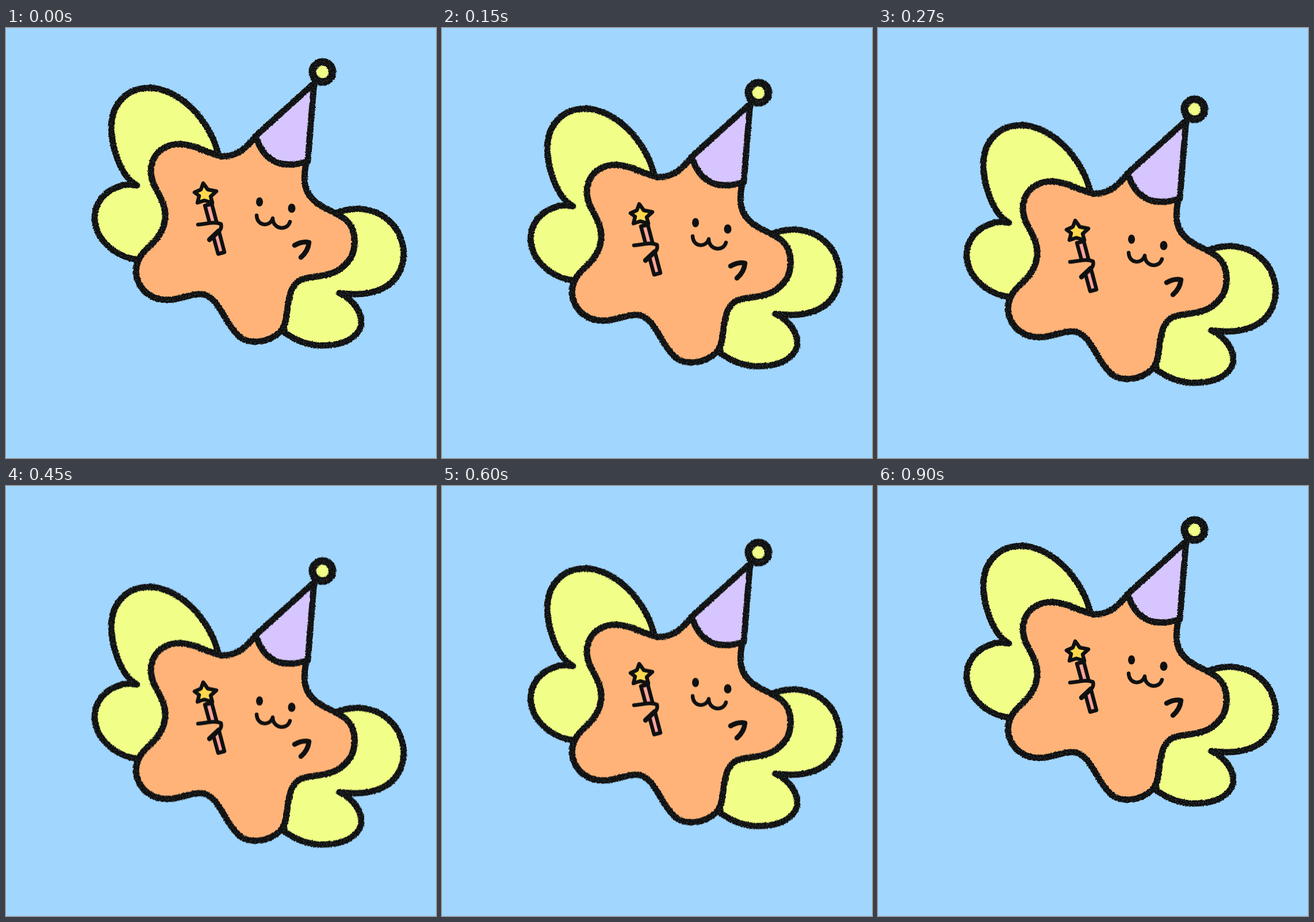
Animation of 748 by 748 pixels, one loop 0.93 s. Source, as an HTML page without scripts:

```html
<!DOCTYPE html>
<html lang="en">
<head>
<meta charset="utf-8">
<title>Floating star fairy</title>
<style>
  html, body { margin: 0; width: 100%; height: 100%; overflow: hidden; background: #a1d6ff; }
  svg { display: block; width: 100%; height: 100%; }

  .ink { fill: none; stroke: #0f1011; stroke-width: 11; stroke-linecap: round; stroke-linejoin: round; }
  .lime { fill: #f1ff88; }
  .peach { fill: #ffb378; }
  .lilac { fill: #d6c5ff; }
  .gold { fill: #ffd84c; }
  .pink { fill: #ffa39b; }
  .fine { stroke-width: 6.5; }
  .hand { stroke-width: 8.5; }
  .pom { stroke-width: 13.5; }
  .eye { fill: #0f1011; }

  .float { animation: float 930ms infinite; }
  @keyframes float {
    0% { transform: translateY(0); animation-timing-function: cubic-bezier(.15, 0, .64, 1); }
    40.32% { transform: translateY(76px); animation-timing-function: cubic-bezier(.35, 0, .49, 1); }
    96.77%, 100% { transform: translateY(0); }
  }
</style>
</head>
<body>
<svg viewBox="0 0 748 748">
  <defs>
    <!-- Rough edges, plus grey grain that only shows on the dark ink -->
    <filter id="crayon" filterUnits="userSpaceOnUse" x="130" y="40" width="590" height="530" color-interpolation-filters="sRGB">
      <feTurbulence type="fractalNoise" baseFrequency=".4" numOctaves="2" seed="4" result="noise"/>
      <feDisplacementMap in="SourceGraphic" in2="noise" scale="3.5" xChannelSelector="R" yChannelSelector="G" result="rough"/>
      <feColorMatrix in="noise" values="0 0 0 0 .2  0 0 0 0 .22  0 0 0 0 .21  0 0 5 0 -2.7" result="grain"/>
      <feBlend in="grain" in2="rough" mode="lighten"/>
      <feComposite in2="rough" operator="in"/>
    </filter>
  </defs>

  <g class="float">
    <g class="ink" filter="url(#crayon)">
      <!-- Wings -->
      <path class="lime" d="M369 220C359 170 308 106 250 104C211 104 185 130 183 170C183 205 198 258 228 274C196 266 154 290 154 331C156 372 193 398 228 403"/>
      <path class="lime" d="M576 321C640 298 693 340 692 396C688 450 640 470 580 461C608 474 622 500 617 520C606 548 570 554 540 552C517 549 500 541 485 530L470 440"/>

      <!-- Body -->
      <path class="peach" d="M433 190C420 206 403 224 376 223C350 219 330 202 300 202C271 203 253 222 252 248C252 280 278 295 277 328C276 356 258 372 245 384C228 400 224 418 227 432C233 458 254 473 280 473C304 473 320 462 340 463C373 467 378 516 410 540C428 550 456 547 476 530C494 508 485 485 497 455C511 424 545 440 577 422C602 407 610 385 605 358C599 326 565 322 542 305C519 288 515 268 523 232"/>

      <!-- Hat -->
      <path class="lilac" d="M434 188L536 96L525 232C490 243 452 242 434 188Z"/>
      <circle class="lime pom" cx="550.5" cy="76.5" r="17.5"/>
    </g>

    <g class="ink fine">
      <!-- Face -->
      <ellipse class="eye" stroke="none" cx="441" cy="302.5" rx="6" ry="8"/>
      <ellipse class="eye" stroke="none" cx="497" cy="313.5" rx="6.5" ry="8"/>
      <path d="M436 326C437 346 460 346 464 331C464 350 489 354 494 337"/>

      <!-- Wand -->
      <path class="pink" d="M346 309L358 306L380 390L369 393Z"/>
      <path class="gold" d="M343 270L351 281L366 284L356 293L359 304L345 300L333 304L336 292L328 286L339 281Z"/>

      <!-- Hands -->
      <path class="peach" stroke="none" d="M346 342L375 340L372 355L356 366Z"/>
      <path d="M334 342C348 341 362 336 374 341C377 352 366 358 354 369"/>
      <path class="hand" d="M354 368L370 353"/>
      <path class="hand" d="M502 378C511 373 519 371 527 373C526 384 520 393 513 399"/>
    </g>
  </g>
</svg>
</body>
</html>
```
